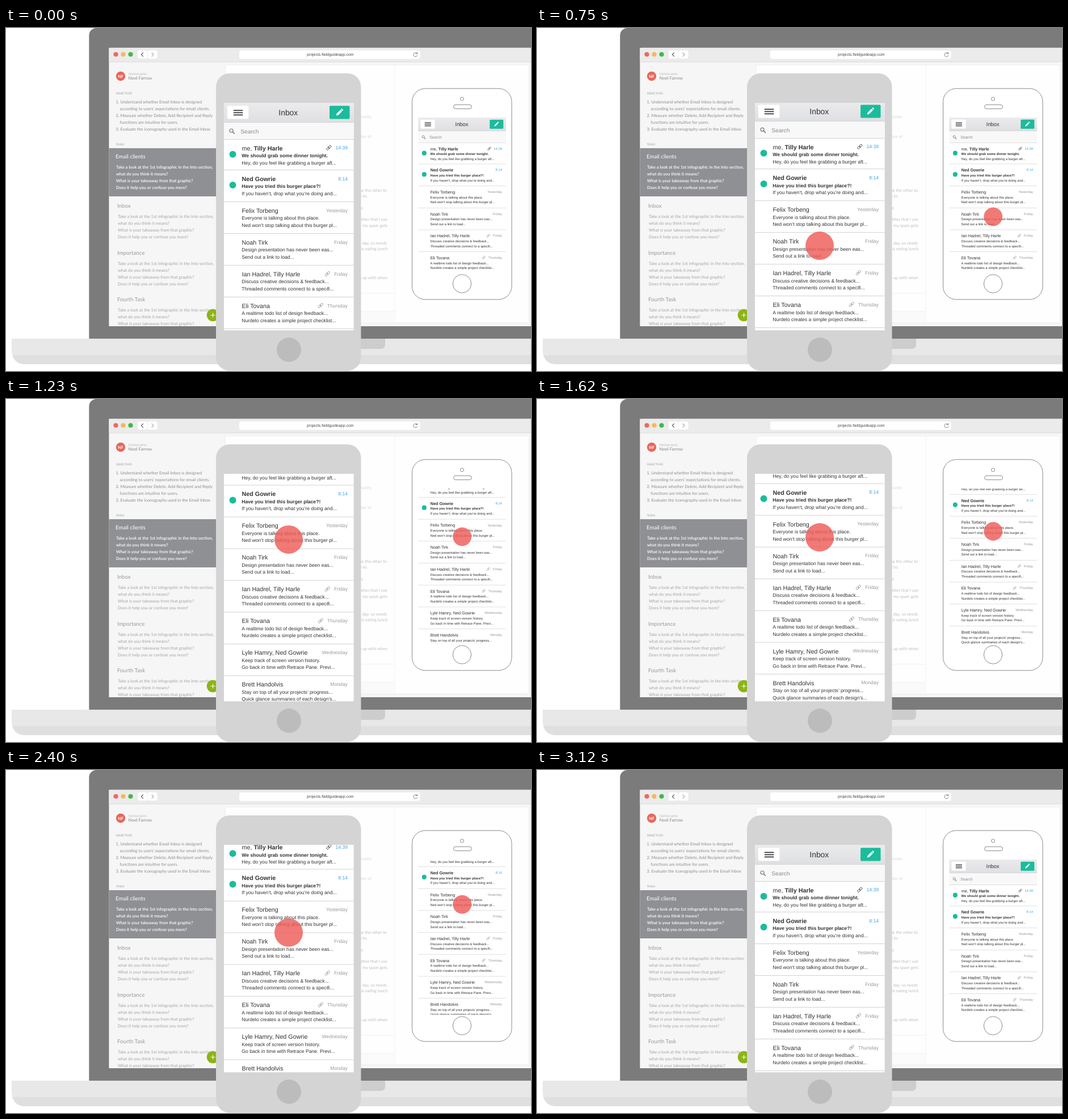
Animation of 925x605 px, one loop 3570 ms. Source, as an HTML page:

```html
<!DOCTYPE html>
<html lang="en">
<head>
<meta charset="utf-8">
<title>Inbox prototype</title>
<style>
html, body { margin: 0; width: 100%; height: 100%; overflow: hidden; background: #fff; }
svg { display: block; width: 925px; height: 605px; text-rendering: geometricPrecision; }
.lato { font-family: Lato, sans-serif; }
.arial { font-family: "Liberation Sans", Arial, sans-serif; }
</style>
</head>
<body>
<svg id="stage" viewBox="0 0 925 605" xmlns="http://www.w3.org/2000/svg"></svg>
<script>
const LOOP = 3570;
const stage = document.getElementById('stage');

const rect = (x, y, w, h, fill, rx = 0, more = '') =>
  `<rect x="${x}" y="${y}" width="${w}" height="${h}" rx="${rx}" fill="${fill}" ${more}/>`;
const dot = (x, y, r, fill, more = '') =>
  `<circle cx="${x}" cy="${y}" r="${r}" fill="${fill}" ${more}/>`;
const path = (d, stroke, width) =>
  `<path d="${d}" fill="none" stroke="${stroke}" stroke-width="${width}"/>`;
// Text placed by the vertical middle of its capitals.
const text = (x, y, size, fill, str, more = '') =>
  `<text x="${x}" y="${y + size * 0.36}" font-size="${size}" fill="${fill}" ${more}>${str}</text>`;
const END = 'text-anchor="end"', MID = 'text-anchor="middle"', BOLD = 'font-weight="700"';

function laptop() {
  return rect(146.3, 0, 800, 560, '#7b7b7b', 13)
    + rect(181.4, 35, 744, 491, '#f6f6f6')
    + '<path d="M10 548H925V593H34Q12 593 10 570Z" fill="#e8e8e8"/>'
    + '<path d="M11 577H925V593H34Q17 593 11 577Z" fill="#dfdfdf"/>'
    + '<path d="M400 548H668V558Q668 566 660 566H400Z" fill="#cdcdce"/>';
}

function browser() {
  const lights = ['#ec6a5e', '#f4b95a', '#3cbb45'].map((c, i) => dot(193.5 + 13 * i, 46.5, 4.1, c)).join('');
  return '<path d="M181.4 60V38Q181.4 34.7 184 34.7H925V60Z" fill="#ebebec"/>'
    + rect(181.4, 59.5, 744, 0.8, '#d6d6d6') + lights
    + rect(232, 39.5, 16.5, 14.5, '#fff', 2.5) + rect(249.5, 39.5, 17, 14.5, '#fff', 2.5)
    + path('M241.8 43.3L238.4 46.8L241.8 50.3', '#555', 1.2)
    + path('M256.6 43.3L260 46.8L256.6 50.3', '#aaa', 1.2)
    + rect(411, 39.5, 318.5, 15, '#fff', 3)
    + text(571.3, 47, 6.94, '#444', 'projects.fieldguideapp.com', MID + ' class="arial"')
    + path('M724.2 45A3.5 3.5 0 1 0 724.8 48M724.6 42.4V45.4H721.6', '#777', 0.9);
}

const questions = ['Take a look at the 1st infographic in the Into section,', 'what do you think it means?',
  'What is your takeaway from that graphic?', 'Does it help you or confuse you more?'];
const goals = ['1. Understand whether Email Inbox is designed', 'according to users’ expectations for email clients.',
  '2. Measure whether Delete, Add Recipient and Reply', 'functions are intuitive for users.',
  '3. Evaluate the iconography used in the Email Inbox'];

function sidebar() {
  const task = (name, x, y, head, body, more = '') =>
    text(x, y, 9.7, head, name) + questions.map((q, i) => text(x + 1, y + 18.8 + 12 * i, 7.4, body, q, more)).join('');
  return '<g class="lato" clip-path="url(#page)">'
    + dot(202, 85, 8.2, '#e8675c') + text(202, 85.2, 7.2, '#fff', 'NF', `${MID} ${BOLD}`)
    + text(215.5, 81, 4.6, '#aaa', 'TESTING WITH') + text(215.5, 88, 7.75, '#888', 'Noel Farrow')
    + text(193.5, 115, 5, '#999', 'OBJECTIVES')
    + goals.map((g, i) => text(i % 2 ? 200.5 : 193.5, 130.2 + 12 * i, 7.4, '#8c8c8c', g)).join('')
    + text(193.5, 205, 5, '#999', 'TASKS')
    + rect(181, 212, 204, 85, '#8f9094')
    + task('Email clients', 193, 226.7, '#fff', '#fff', 'font-weight="600"')
    + task('Inbox', 196, 314, '#999', '#a3a3a3')
    + task('Importance', 196, 396.5, '#999', '#a3a3a3')
    + task('Fourth Task', 196, 479, '#999', '#a3a3a3')
    + '</g>' + dot(364.5, 506.5, 10.8, '#8cb414')
    + path('M360.5 506.5H368.5M364.5 502.5V510.5', '#fff', 1.1);
}

function page() {
  const words = [[644, 156, 'opportunity'], [644, 191, 'number of'], [671, 286, 'use the other to'], [637, 296, 'n to.'],
    [629, 317, 'o'], [672, 337.5, 'other that I use'], [672, 348, 'my spam gets'],
    [671, 379, 'day, so needs'], [672.5, 389, 'is eating lunch'], [672, 440.5, 'n up with when']];
  return rect(385.5, 65.5, 536.5, 455, '#ececec', 1) + rect(386.5, 66, 534.5, 453.5, '#fefefe')
    + rect(684.5, 66, 0.8, 453.5, '#ededed') + rect(386, 467.5, 298.5, 0.8, '#ededed')
    + rect(386, 500, 298.5, 19.5, '#fafafa') + rect(386, 499.5, 298.5, 0.8, '#ededed')
    + '<g class="lato">' + words.map(([x, y, s], i) => text(x, y, 7.4, i < 2 ? '#d6d6d6' : '#bdbdbd', s, END)).join('') + '</g>';
}

// name, two lines, date, link icon position (0 = none)
const mails = [
  ['me, <tspan font-weight="700">Tilly Harle</tspan>', 'We should grab some dinner tonight.', 'Hey, do you feel like grabbing a burger aft...', '14:39', 185],
  ['Ned Gowrie', 'Have you tried this burger place?!', 'If you haven’t, drop what you’re doing and...', '8:14', 0],
  ['Felix Torbeng', 'Everyone is talking about this place.', 'Ned won’t stop talking about this burger pl...', 'Yesterday', 0],
  ['Noah Tirk', 'Design presentation has never been eas...', 'Send out a link to load...', 'Friday', 0],
  ['Ian Hadrel, Tilly Harle', 'Discuss creative decisions &amp; feedback...', 'Threaded comments connect to a specifi...', 'Friday', 182.5],
  ['Eli Tovana', 'A realtime todo list of design feedback...', 'Nurdelo creates a simple project checklist...', 'Thursday', 170.5],
  ['Lyle Hamry, Ned Gowrie', 'Keep track of screen version history.', 'Go back in time with Retrace Pane. Previ...', 'Wednesday', 0],
  ['Brett Handolvis', 'Stay on top of all your projects’ progress...', 'Quick glance summaries of each design’s...', 'Monday', 0]
];

function link(x, color) {
  return `<g transform="translate(${x} -.5) rotate(-45)" fill="none" stroke="${color}" stroke-width=".9">`
    + '<rect x="-5" y="-1.7" width="5.8" height="3.4" rx="1.7"/><rect x="-.8" y="-1.7" width="5.8" height="3.4" rx="1.7"/></g>';
}

function mail([name, top, low, date, pin], i) {
  const unread = i < 2;
  const y = i ? 78 + 56 * i : 79.7;
  return `<g transform="translate(0 ${y})">` + (i ? rect(0, -16, 229, 1, '#d2d2d2') : '')
    + (unread ? dot(15.7, 11, 6, '#1bbc9b') : '')
    + text(31.7, 0, 10.75, '#333', name, i === 1 ? BOLD : '')
    + text(31.5, 13.4, 8.6, '#333', top, unread ? BOLD : '') + text(31.5, 25.8, 8.65, '#333', low)
    + text(218.2, -0.6, 8.65, unread ? '#42a5e5' : '#999', date, END)
    + (pin ? link(pin, unread ? '#444' : '#999') : '') + '</g>';
}

function header() {
  return rect(0, 0, 229, 35, 'url(#bar)') + rect(0, 34, 229, 1, '#d4d4d7')
    + rect(6, 5.3, 37.5, 23, '#fff', 2)
    + path('M17 13.3H33.5M17 17.3H33.5M17 21.3H33.5', '#333', 1.8)
    + text(113.5, 17, 13.9, '#333', 'Inbox', MID)
    + rect(186.2, 5.3, 35.5, 23.2, '#1bbc9b', 2)
    + '<path d="M197.9 22.6l.9-3.6 6.7-6.7 2.7 2.7-6.7 6.7zM206.3 11.5l1-1q.5-.5 1 0l1.7 1.7q.5.5 0 1l-1 1z" fill="#fff"/>'
    + rect(0, 35, 229, 30, '#f8f8f8') + rect(0, 64, 229, 1, '#d2d2d2')
    + '<circle cx="13.2" cy="49" r="3" fill="none" stroke="#777" stroke-width="1.2"/>'
    + path('M15.5 51.3L19 54.8', '#777', 1.6) + text(29.5, 50.3, 10.1, '#8a8a8a', 'Search');
}

function screen(id, place, height) {
  return `<g transform="${place}"><clipPath id="${id}Clip"><rect width="229" height="${height}"/></clipPath>`
    + `<g clip-path="url(#${id}Clip)">${rect(0, 0, 229, height, '#fff')}<use id="${id}" href="#list"/></g></g>`;
}

function phones() {
  const line = 'stroke="#7d7d7d" stroke-width=".9"';
  return rect(715.5, 106.8, 175.5, 372, '#fff', 23, line)
    + dot(803.5, 125, 3, '#fff', line) + rect(788.5, 135.3, 32, 7.2, '#fff', 3.6, line)
    + dot(803.5, 451, 16.2, '#fff', line)
    + screen('smallList', 'translate(726.2 158) scale(.677 .691)', 396.5)
    + rect(370, 80, 255.5, 524.5, '#d4d4d4', 24) + dot(498.5, 567.5, 21.5, '#bcbcbc')
    + screen('bigList', 'translate(383.8 132)', 401.5)
    + dot(498, 0, 25, '#ee5f5c', 'id="bigTouch"') + dot(803.7, 0, 16.4, '#ee5f5c', 'id="smallTouch"');
}

stage.innerHTML = '<defs><linearGradient id="bar" x2="0" y2="1"><stop stop-color="#ebebed"/><stop offset="1" stop-color="#dedfe2"/></linearGradient>'
  + '<clipPath id="page"><rect x="181.4" y="60" width="204" height="466"/></clipPath>'
  + `<g id="list" class="arial">${header()}${mails.map(mail).join('')}</g></defs>`
  + laptop() + browser() + page() + sidebar() + phones();

// Start y, distance, start and length of the drag, start of the way back
const BACK = 620;
const moves = [
  ['bigList', 0, -101.3, 480, 1045, 2130],
  ['bigTouch', 386.3, -142.3, 495, 1022, 2121],
  ['smallList', 0, -103.7, 633, 905, 2223],
  ['smallTouch', 333.2, -99.7, 550, 1060, 2218]
].map(([id, ...rest]) => [document.getElementById(id), ...rest]);
const touches = [moves[1][0], moves[3][0]];

const part = (t, start, length) => Math.min(1, Math.max(0, (t - start) / length));
const quint = u => u < 0.5 ? 16 * u ** 5 : 1 - 16 * (1 - u) ** 5;
const smooth = u => u * u * (3 - 2 * u);

function draw() {
  const t = performance.now() % LOOP;
  for (const [el, y, dist, start, length, back] of moves) {
    const p = quint(part(t, start, length)) - quint(part(t, back, BACK));
    el.setAttribute('transform', `translate(0 ${(y + dist * p).toFixed(2)})`);
  }
  const alpha = 0.83 * (smooth(part(t, 10, 530)) - smooth(part(t, 2690, 420)));
  for (const el of touches) el.setAttribute('opacity', alpha.toFixed(3));
  requestAnimationFrame(draw);
}
draw();
</script>
</body>
</html>
```
